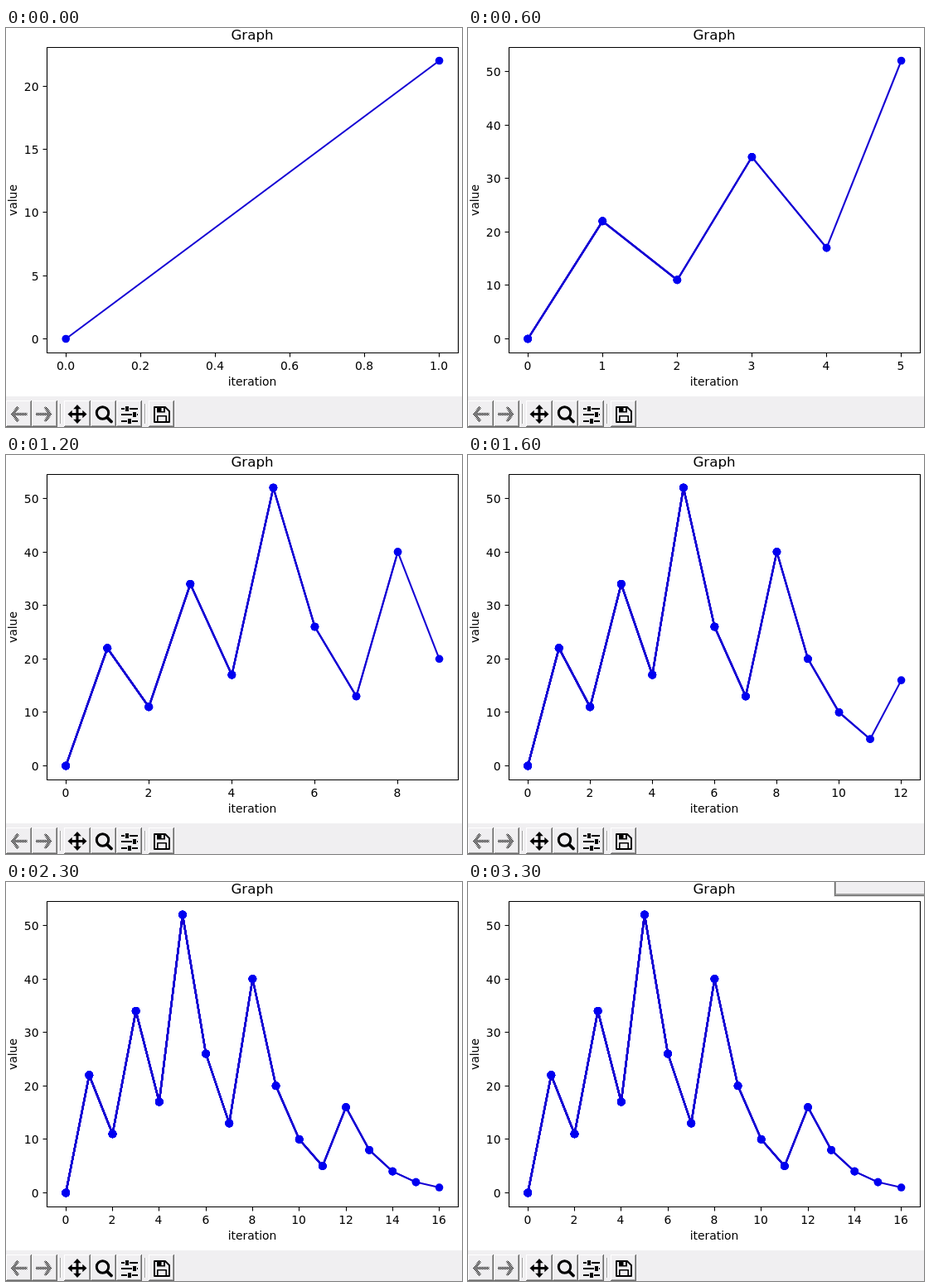
An HTML page with a canvas for the animation above (3.4 s loop, 550 by 482 pixels).

```html
<!DOCTYPE html>
<html lang="en">
<head>
<meta charset="utf-8">
<title>Graph</title>
<style>
html, body { margin: 0; width: 550px; height: 482px; overflow: hidden; background: #fff; }
canvas { display: block; }
</style>
</head>
<body>
<canvas id="stage" width="550" height="482"></canvas>
<script>
const ctx = document.getElementById('stage').getContext('2d');
const LOOP = 3400, TICK = 100, STEP = 136, PANEL_AT = 2700;
const BOX = { l: 49.5, t: 23.5, r: 545.5, b: 392.5 };
const X0 = 72.2, X1 = 522.6, Y0 = 375.5, Y1 = 39.5;
const FONT = '"DejaVu Sans", Verdana, sans-serif';

// A zero, then the halve-or-triple sequence from 22 down to 1
const data = [0];
for (let v = 22; ; v = v % 2 ? 3 * v + 1 : v / 2) {
  data.push(v);
  if (v === 1) break;
}

function rect(x, y, w, h, color) {
  ctx.fillStyle = color;
  ctx.fillRect(x, y, w, h);
}

function stroke(points, width, color = '#000') {
  ctx.beginPath();
  points.forEach(([x, y]) => ctx.lineTo(x, y));
  ctx.lineWidth = width;
  ctx.strokeStyle = color;
  ctx.stroke();
}

function shape(points, color = '#000') {
  ctx.beginPath();
  points.forEach(([x, y]) => ctx.lineTo(x, y));
  ctx.fillStyle = color;
  ctx.fill();
}

function disc(x, y, r, color) {
  ctx.beginPath();
  ctx.arc(x, y, r, 0, 7);
  ctx.fillStyle = color;
  ctx.fill();
}

function label(text, x, y, align = 'center', size = 13.89) {
  ctx.font = size + 'px ' + FONT;
  ctx.textAlign = align;
  ctx.fillStyle = '#000';
  ctx.fillText(text, x, y);
}

// Tick spacing giving at most nine intervals over the padded range
function tickStep(max) {
  const raw = max * 1.1 / 9;
  const unit = 10 ** Math.floor(Math.log10(raw));
  return [1, 2, 2.5, 5, 10].find(s => s * unit >= raw - 1e-9) * unit;
}

function eachTick(max, draw) {
  const step = tickStep(max);
  const digits = step >= 1 ? 0 : Math.abs(step - 0.25) < 1e-6 ? 2 : 1;
  for (let i = 0; i * step <= max * 1.045; i++) {
    draw(i * step / max, (i * step).toFixed(digits));
  }
}

function drawAxes(last, top) {
  ctx.lineCap = 'butt';
  eachTick(last, (f, text) => {
    const x = Math.floor(X0 + f * (X1 - X0)) + 0.5;
    stroke([[x, BOX.b], [x, BOX.b + 5]], 1.1);
    label(text, x - 0.5, 413);
  });
  eachTick(top, (f, text) => {
    const y = Math.floor(Y0 + f * (Y1 - Y0)) + 0.5;
    stroke([[BOX.l - 5, y], [BOX.l, y]], 1.1);
    label(text, 39.5, y + 5, 'right');
  });
  ctx.lineWidth = 1.1;
  ctx.strokeStyle = '#000';
  ctx.strokeRect(BOX.l, BOX.t, BOX.r - BOX.l, BOX.b - BOX.t);
  label('Graph', 297, 14, 'center', 16.67);
  label('iteration', 297, 432);
  ctx.save();
  ctx.translate(13, 208);
  ctx.rotate(-Math.PI / 2);
  label('value', 0, 0);
  ctx.restore();
}

function drawPlot(last) {
  const top = Math.max(...data.slice(0, last + 1));
  const points = data.slice(0, last + 1).map((v, i) =>
    [X0 + i / last * (X1 - X0), Y0 + v / top * (Y1 - Y0)]);
  ctx.lineJoin = 'round';
  // Every update redraws the whole line, so older parts get heavier
  for (let n = 1; n <= last; n++) {
    const part = points.slice(0, n + 1);
    stroke(part, 2.08, '#1400d4');
    part.forEach(([x, y]) => disc(x, y, 4.8, '#0000f0'));
  }
  drawAxes(last, top);
}

function button(x, w) {
  rect(x, 450, w, 32, '#696969');
  rect(x, 450, w - 1, 31, '#fff');
  rect(x + 1, 451, w - 2, 30, '#a0a0a0');
  rect(x + 1, 451, w - 3, 29, '#f0eff1');
}

const dots = document.createElement('canvas');
dots.width = dots.height = 2;
const dotCtx = dots.getContext('2d');
dotCtx.fillRect(0, 0, 1, 1);
dotCtx.fillRect(1, 1, 1, 1);
const stipple = ctx.createPattern(dots, 'repeat');

function arrow(cx, dir) {
  const at = pts => pts.map(([x, y]) => [cx + dir * x, 466.5 + y]);
  ctx.lineJoin = 'miter';
  stroke(at([[1.5, -8.5], [8, 0], [1.5, 8.5]]), 3.4, stipple);
  stroke(at([[-9.5, 0], [8, 0]]), 3.4, stipple);
}

function moveIcon(cx, cy) {
  for (let i = 0; i < 4; i++) {
    ctx.save();
    ctx.translate(cx, cy);
    ctx.rotate(i * Math.PI / 2);
    rect(-1.5, -8, 3, 9, '#000');
    shape([[0, -11.5], [4.8, -6.3], [-4.8, -6.3]]);
    ctx.restore();
  }
}

function zoomIcon() {
  ctx.beginPath();
  ctx.arc(116.5, 465, 7.2, 0, 7);
  ctx.lineWidth = 3;
  ctx.strokeStyle = '#000';
  ctx.stroke();
  ctx.lineCap = 'round';
  stroke([[122.5, 471], [127, 475.5]], 3.8);
  ctx.lineCap = 'butt';
}

function slidersIcon() {
  [[459, 144], [466, 153], [474, 147]].forEach(([y, x]) => {
    rect(139, y, 20, 2, '#000');
    rect(x - 1, y - 2, 6, 6, '#f0eff1');
    rect(x, y - 2, 4, 6, '#000');
  });
}

function saveIcon() {
  ctx.lineJoin = 'round';
  ctx.beginPath();
  [[179, 458], [192, 458], [197, 463], [197, 476], [179, 476]]
    .forEach(([x, y]) => ctx.lineTo(x, y));
  ctx.closePath();
  ctx.lineWidth = 1.9;
  ctx.strokeStyle = '#000';
  ctx.stroke();
  rect(182, 458, 10, 6.5, '#000');
  rect(187.5, 459, 2.5, 4, '#f0eff1');
  ctx.lineWidth = 1.6;
  ctx.strokeRect(182.8, 468.8, 10.4, 7);
}

function drawToolbar() {
  rect(0, 445, 550, 37, '#f0eff1');
  [[0, 31], [31, 31], [70, 32], [102, 31], [133, 31], [172, 31]]
    .forEach(([x, w]) => button(x, w));
  [66, 168].forEach(x => {
    rect(x - 1, 454, 1, 24, '#a0a0a0');
    rect(x, 454, 1, 24, '#fff');
  });
  arrow(16, -1);
  arrow(45.5, 1);
  moveIcon(86, 466.5);
  zoomIcon();
  slidersIcon();
  saveIcon();
}

function drawPanel() {
  rect(441, 0, 109, 18, '#e3e3e3');
  rect(442, 0, 108, 17, '#696969');
  rect(443, 0, 107, 16, '#a0a0a0');
  rect(444, 0, 106, 14, '#f0eff1');
}

function frame(now) {
  const t = Math.floor(now % LOOP / TICK) * TICK;
  const last = Math.min(1 + Math.floor(t / STEP), data.length - 1);
  rect(0, 0, 550, 482, '#fff');
  drawPlot(last);
  drawToolbar();
  if (t >= PANEL_AT) drawPanel();
}

const start = performance.now();
function loop() {
  frame(performance.now() - start);
  requestAnimationFrame(loop);
}
loop();
</script>
</body>
</html>
```
